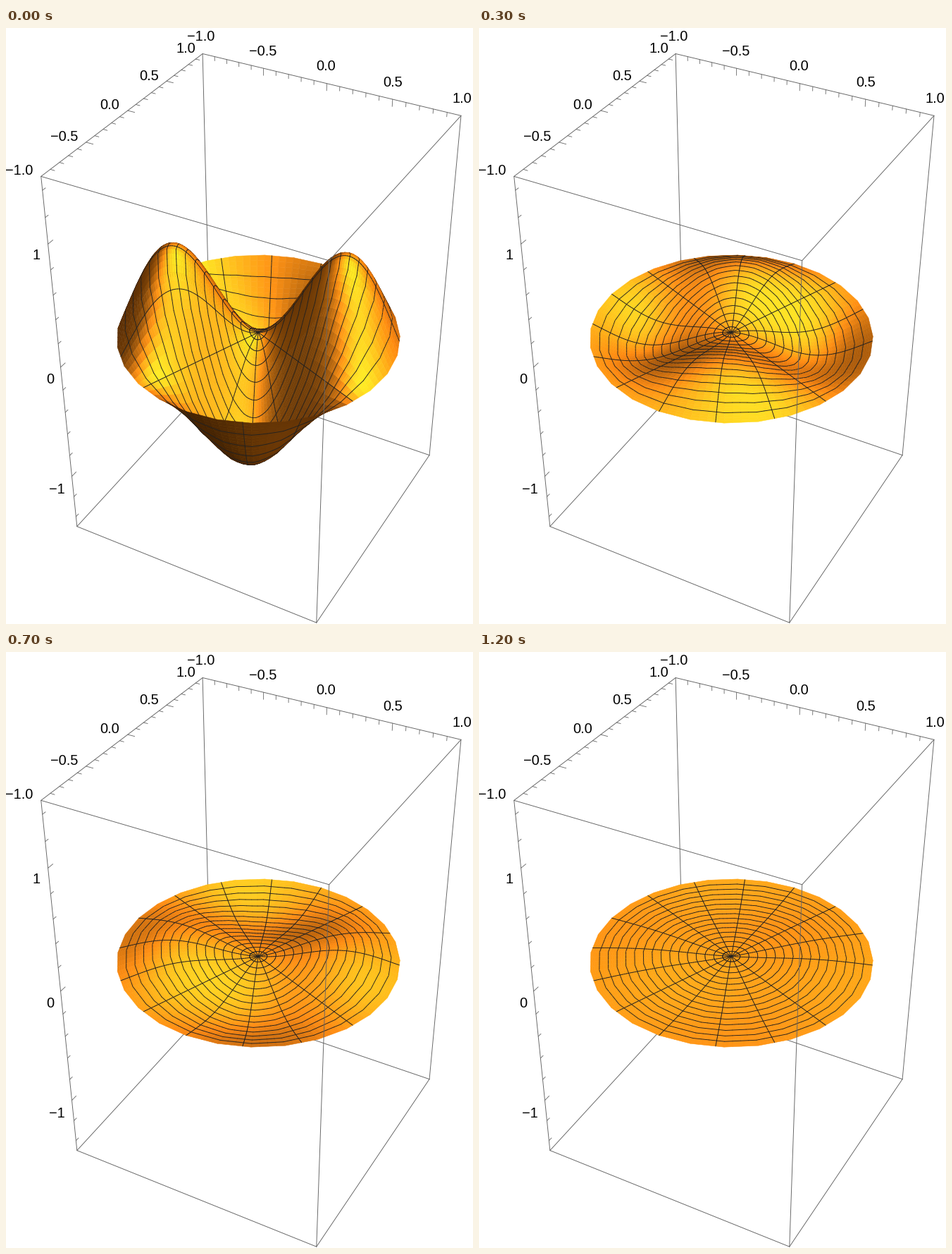
Write a matplotlib script that moves like this. It is 663 px wide and 845 px high and loops after 1.3 s.

```python
import numpy as np
import matplotlib.pyplot as plt
from matplotlib.animation import FuncAnimation
from matplotlib.collections import LineCollection, PolyCollection

W, H, DPI = 663, 845, 100
PX = 72 / DPI
FRAMES, STEP_MS = 13, 100

# camera
VIEW = np.array([1.3, -2.4, 2.0])
DIST = 3 * np.linalg.norm(VIEW)
VIEW = VIEW / np.linalg.norm(VIEW)
RIGHT = np.array([2.4, 1.3, 0.0]) / np.hypot(2.4, 1.3)
UP = np.cross(VIEW, RIGHT)
FOCAL, CX, CY = 2035, 357.8, 431.1

# orange material under three tinted lights placed in view space
MATERIAL = np.array([0.8807, 0.6110, 0.1421])
AMBIENT = np.array([0.3010, 0.2241, 0.0905])
LIGHT = np.array([0.2642, 0.1833, 0.0426])
LIGHT_DIRS = [(0, 1, 1), (1, 1, 1), (1, 0, 1)]
SHININESS = 3

# membrane mode
ROOT = 5.1356
NR, NT, SIDES, MESH = 64, 112, 28, 16


def project(p):
    """Return screen x, screen y and distance for points (..., 3)."""
    p = np.asarray(p, float)
    w = DIST - p @ VIEW
    return np.stack([CX + FOCAL * (p @ RIGHT) / w,
                     CY - FOCAL * (p @ UP) / w, w], axis=-1)


def bessel(n, x):
    tau = (np.arange(64) + 0.5) * np.pi / 64
    return np.cos(n * tau - np.asarray(x)[..., None] * np.sin(tau)).mean(-1)


def amplitude(i):
    return 2 * np.exp(-0.3 * i) * np.cos(2.49 * i + np.pi / 4)


def unit(v):
    v = np.asarray(v, float)
    return v / np.linalg.norm(v, axis=-1, keepdims=True)


def shade(normal):
    """Two-sided Blinn shading for normals in view space."""
    color = np.tile(AMBIENT * MATERIAL, normal.shape[:-1] + (1,))
    for d in LIGHT_DIRS:
        light = unit(d)
        half = unit(light + [0, 0, 1])
        diffuse = np.clip(normal @ light, 0, 1)[..., None]
        gloss = np.clip(normal @ half, 0, 1)[..., None] ** SHININESS
        color += LIGHT * (MATERIAL * diffuse + gloss)
    return np.clip(color, 0, 1)


# vertex grid; the rim is a polygon
r, t = np.linspace(0, 1, NR + 1), np.linspace(0, 2 * np.pi, NT + 1)
R, T = np.meshgrid(r, t, indexing="ij")
side = 2 * np.pi / SIDES
rho = R * np.cos(side / 2) / np.cos(T % side - side / 2)
X, Y = rho * np.cos(T), rho * np.sin(T)
MODE = bessel(2, ROOT * r)[:, None] * np.cos(2 * T - np.pi / 4)

# slopes at cell centres
rc, tc = (r[1:] + r[:-1]) / 2, (t[1:] + t[:-1]) / 2
RC, TC = np.meshgrid(rc, tc, indexing="ij")
slope = ROOT * (bessel(1, ROOT * rc) - bessel(3, ROOT * rc)) / 2
SR = slope[:, None] * np.cos(2 * TC - np.pi / 4)
ST = -2 * (bessel(2, ROOT * rc) / rc)[:, None] * np.sin(2 * TC - np.pi / 4)
SX = SR * np.cos(TC) - ST * np.sin(TC)
SY = SR * np.sin(TC) + ST * np.cos(TC)


def cell_colors(a, points):
    n = unit(np.stack([-a * SX, -a * SY, np.ones_like(SX)], axis=-1))
    mid = (points[1:, 1:] + points[:-1, :-1]) / 2
    facing = ((DIST * VIEW - mid) * n).sum(-1)
    n = n * np.where(facing < 0, -1, 1)[..., None]
    return shade(n @ np.stack([RIGHT, UP, VIEW], axis=1))


def segments(p, q):
    return np.stack([p, q], axis=2).reshape(-1, 2, 3)


def surface(a):
    """Depth-sorted cells and mesh lines with their paints and widths."""
    points = np.stack([X, Y, a * MODE], axis=-1)
    s = project(points)
    cells = np.stack([s[:-1, :-1], s[1:, :-1], s[1:, 1:], s[:-1, 1:],
                      s[:-1, :-1]], axis=2).reshape(-1, 5, 3)
    rings = s[NR // MESH:NR:NR // MESH]
    spokes = s[:, NT // MESH:NT:NT // MESH]
    lines = np.concatenate([segments(rings[:, :-1], rings[:, 1:]),
                            segments(spokes[:-1], spokes[1:])])

    nc, nl = len(cells), len(lines)
    face, edge = np.zeros((nc + nl, 4)), np.ones((nc + nl, 4))
    face[:nc, :3] = edge[:nc, :3] = cell_colors(a, points).reshape(-1, 3)
    face[:nc, 3] = 1
    edge[nc:, :3] = 0.13
    width = np.r_[np.full(nc, 0.5), np.full(nl, 0.9)] * PX
    # lines sit slightly nearer than the cells they lie on
    depth = np.r_[cells[:, :4, 2].mean(1), lines[..., 2].mean(1) - 0.03]
    order = np.argsort(-depth, kind="stable")
    shapes = [c[:, :2] for c in cells] + [l[:, :2] for l in lines]
    return [shapes[k] for k in order], face[order], edge[order], width[order]


# the small surplus keeps rounding from dropping a pixel
fig = plt.figure(figsize=((W + 0.01) / DPI, (H + 0.01) / DPI), dpi=DPI,
                 facecolor="white")
ax = fig.add_axes([0, 0, 1, 1])
ax.set_xlim(-0.5, W - 0.5)
ax.set_ylim(H - 0.5, -0.5)
ax.axis("off")


def add_lines(pairs, z, width=0.95):
    ax.add_collection(LineCollection(
        [project(p)[:, :2] for p in pairs], colors="#666666",
        linewidths=width * PX, zorder=z, capstyle="round"), autolim=False)


def draw_box():
    top = 1.5
    corners = [(x, y, z) for x in (-1, 1) for y in (-1, 1) for z in (-top, top)]
    back = (-1, 1, -top)
    hidden, shown = [], []
    for i, p in enumerate(corners):
        for q in corners[i + 1:]:
            if sum(u != v for u, v in zip(p, q)) == 1:
                (hidden if back in (p, q) else shown).append((p, q))
    add_lines(hidden, 1)
    add_lines(shown, 3)


def draw_ticks():
    ticks = []

    def tick(p, direction, major):
        p = np.array(p, float)
        ticks.append((p, p + np.array(direction) * (0.055 if major else 0.033)))

    for k in range(-9, 10):
        tick((k / 10, 1, 1.5), (0, 0, -1), k % 5 == 0)
        tick((-1, k / 10, 1.5), (1, 0, 0), k % 5 == 0)
    for k in range(-7, 8):
        tick((-1, -1, k / 5), (0, 1, 0), k % 5 == 0)
    add_lines(ticks, 3, 0.85)


def draw_labels():
    def label(s, x, y):
        ax.text(x, y + 7.2, s.replace("-", "\u2212"), ha="center",
                va="baseline", family="Liberation Sans", size=20 * PX,
                color="black", zorder=4)

    steps = ["-1.0", "-0.5", "0.0", "0.5", "1.0"]
    x_spots = [(276.5, 10), (364, 31), (454, 52), (549, 75), (647, 98)]
    y_spots = [(18.5, 200), (82, 152), (147, 107), (203, 66), (255, 27)]
    z_spots = [(72, 652), (62, 496), (43, 320)]
    for names, spots in ((steps, x_spots), (steps, y_spots),
                         (["-1", "0", "1"], z_spots)):
        for name, (x, y) in zip(names, spots):
            label(name, x, y)


draw_box()
draw_ticks()
draw_labels()
membrane = PolyCollection([], closed=False, zorder=2, capstyle="round",
                          joinstyle="round")
ax.add_collection(membrane, autolim=False)


def update(i):
    shapes, face, edge, width = surface(amplitude(i))
    membrane.set_verts(shapes, closed=False)
    membrane.set_facecolor(face)
    membrane.set_edgecolor(edge)
    membrane.set_linewidth(width)
    return (membrane,)


anim = FuncAnimation(fig, update, frames=FRAMES, interval=STEP_MS,
                     repeat=True, repeat_delay=0, blit=False)
plt.show()
```
